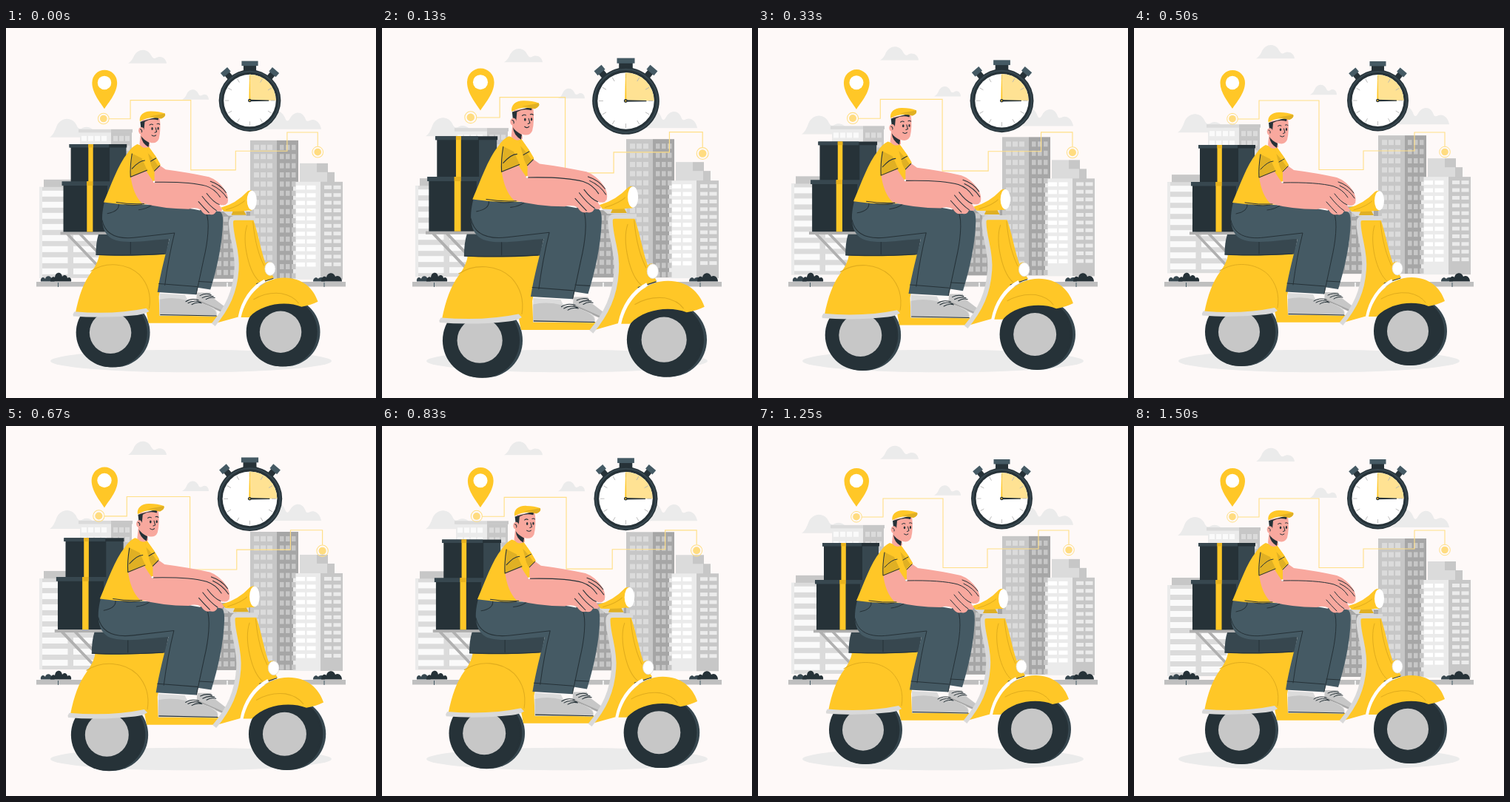
These frames come from a looping animation (500 by 500 pixels, 1540 ms). An HTML page:

```html
<!DOCTYPE html>
<html lang="en">
<head>
<meta charset="utf-8">
<title>Delivery scooter</title>
<style>
html, body { margin: 0; width: 100%; height: 100%; overflow: hidden; background: #fef9f8; }
svg { display: block; width: 100%; height: 100%; }
.y { fill: #ffc727; } .d { fill: #263238; } .s { fill: #37474f; } .b { fill: #455a64; }
.skin { fill: #f8a89e; } .shade { fill: #e0b024; }
.g1 { fill: #ebebeb; } .g2 { fill: #dbdbdb; } .g3 { fill: #c7c7c7; } .g4 { fill: #a6a6a6; }
.ln { fill: none; stroke: #263238; stroke-width: 1; stroke-linecap: round; stroke-linejoin: round; }
.gold { fill: none; stroke: #e0ac1d; stroke-width: 1; stroke-linecap: round; }
</style>
</head>
<body>
<svg viewBox="0 0 500 500" xmlns="http://www.w3.org/2000/svg">
  <g id="city">
    <g class="g1">
      <path d="M165 48C168 46 170 44 172 40C177 27 191 27 196 37C198 40 199 42 202 41C208 37 216 40 217 48Z"/>
      <path d="M238 97C241 95 243 93 244 90C248 81 257 82 260 89C261 92 263 92 265 91C269 88 274 91 274 97Z"/>
      <path d="M59 148C64 145 66 139 68 134C74 119 91 120 96 133C98 137 101 137 104 135C112 131 121 138 124 148Z"/>
      <path d="M345 137C352 135 356 129 359 121C364 108 374 112 378 124C380 127 382 126 384 122C390 112 401 112 405 124C406 127 409 126 411 125C418 122 425 129 426 137Z"/>
    </g>
    <rect class="g3" x="51" y="205" width="40" height="11"/>
    <rect class="g2" x="45" y="215" width="80" height="123"/>
    <rect class="g1" x="45" y="215" width="4" height="123"/>
    <g id="bands"></g>
    <rect class="g1" x="100" y="141" width="42" height="120"/>
    <rect class="g3" x="142" y="141" width="28" height="120"/>
    <rect class="g2" x="98" y="137" width="44" height="4.5"/>
    <rect class="g3" x="142" y="137" width="29" height="4.5"/>
    <rect class="g4" x="275" y="248" width="56" height="91"/>
    <rect class="g3" x="330" y="152" width="36" height="187"/>
    <rect class="g4" x="366" y="152" width="29" height="187"/>
    <rect class="g2" x="397" y="183" width="23" height="30"/>
    <rect class="g3" x="420" y="183" width="15" height="30"/>
    <rect class="g2" x="420" y="195" width="14" height="16"/>
    <rect class="g3" x="434" y="195" width="10" height="16"/>
    <rect class="g1" x="388" y="208" width="37" height="132"/>
    <rect class="g3" x="425" y="208" width="30" height="132"/>
    <g id="panes"></g>
  </g>

  <ellipse class="g1" cx="250" cy="450" rx="190" ry="15.3"/>
  <rect x="41" y="343" width="418" height="6.5" fill="#bfbfbf"/>
  <path d="M70.500 344v6M113 344v6M430 344v6" stroke="#455a64" stroke-width="1"/>
  <path d="M299 344v6" stroke="#fff" stroke-width="1.500"/>
  <path class="s" d="M47 342.500C46 337 51 335 53 339C54 334 61 334 62 340L66 342.500Z"/>
  <path class="d" d="M60 342.500C60 337 64 335 66 337C67 329 75 329 76 336C79 332 83 335 83 338C86 335 89 339 88 342.500Z"/>
  <path class="s" d="M415 342.500C415 338 419 335 422 339C424 336 430 336 431 342.500Z"/>
  <path class="d" d="M426 342.500C426 337 430 334 433 337C434 330 443 329 445 336C449 333 454 337 454 342.500Z"/>

  <g id="route">
    <path d="M140 123H169V98H250V191.500H310V166H379V141H420V160" fill="none" stroke="#ffdf87" stroke-width="1.100"/>
    <g fill="none" stroke="#ffdf87" stroke-width="1"><circle cx="133" cy="122.700" r="7.300"/><circle cx="420" cy="167.500" r="7.300"/></g>
    <g fill="#ffdc80"><circle cx="133" cy="122.700" r="4.800"/><circle cx="420" cy="167.500" r="4.800"/></g>
  </g>

  <g id="pin">
    <path class="y" d="M133 109C128 101 116.500 88 116.500 74A16.700 17 0 0 1 150 74C150 88 138 101 133 109Z"/>
    <circle cx="133" cy="74" r="9.200" fill="#fff"/>
  </g>

  <g id="watch">
    <rect class="d" x="321" y="50" width="17" height="9"/>
    <rect class="b" x="318.500" y="45" width="22" height="6.500"/>
    <g id="sides"></g>
    <circle class="d" cx="329.500" cy="98" r="41.500"/>
    <circle cx="329.500" cy="98" r="39" fill="none" stroke="#37474f" stroke-width="2"/>
    <circle cx="329.500" cy="98" r="35" fill="#fff"/>
    <path d="M329.500 98V63A35 35 0 0 1 364.500 98Z" fill="#ffe293"/>
    <g id="ticks" stroke="#b5b5b5" stroke-width=".8"></g>
    <path class="y" d="M328.300 98L329 63.500H329.600L330.300 98Z"/>
    <path class="d" d="M328 96.800L355 97.500V98.700L328 99.200Z"/>
    <circle class="d" cx="329.300" cy="98" r="2.200"/><circle class="y" cx="329.300" cy="98" r=".9"/>
  </g>

  <g id="ride">
    <!-- rack and parcels -->
    <path d="M84 278L126 322M101 278L130 308" stroke="#b0b0b0" stroke-width="3.600"/>
    <rect x="75" y="275.500" width="62" height="3.800" fill="#b0b0b0"/>
    <path class="d" d="M89 161H163V209H89Z"/><path class="s" d="M141 162H163V209H141Z"/>
    <path class="d" d="M87 158H164V162.500H87Z"/><path class="s" d="M87 158H140V162.500H87Z"/>
    <path class="d" d="M79 212H150V275.500H79Z"/><path class="s" d="M138 213H150V275.500H138Z"/>
    <path class="s" d="M77 208H150V213.500H77Z"/>
    <path class="y" d="M112.500 158h6.300v50h-6.300zM110.500 208h8v67.500h-8z"/>
    <path d="M112.500 158h6.300v4.500h-6.300zM110.500 208h8v5.500h-8z" fill="#e9b31e"/>

    <!-- wheels -->
    <g id="wheel">
      <circle class="s" cx="149" cy="410.700" r="46"/><circle class="d" cx="145" cy="410.700" r="46.300"/>
      <circle class="d" cx="142" cy="410.700" r="46"/><circle class="g3" cx="142" cy="410.700" r="28"/>
    </g>
    <use href="#wheel" x="228" y="-1"/>

    <!-- chassis -->
    <path class="y" d="M127 306L217 304L207 362L208 388H284L302 388L281 397.700H193L190 382Q142 389 95 385C100 360 106 344 116 330C122 322 126 314 127 306Z"/>
    <path d="M91.800 386L93.800 382.500Q147 387 190 378L194 382Q188 386 178 387Q133 392 92.300 388.500Z" fill="#d9d9d9"/>
    <path class="gold" d="M116 328C136 315 164 317 181 333C192 345 197 360 194 378"/>
    <path class="s" d="M126 279H222L217 305.500Q160 309 122.500 306.500Q122.500 290 126 279Z"/>
    <path class="ln" d="M169 289V305M123 306Q165 308 214 305" stroke-width=".7"/>

    <!-- shoes -->
    <path class="g3" d="M258 357L276 357L277 362L298 378Q299 382 292 384L257 368Z"/>
    <path d="M258 367L294 383" stroke="#a6a6a6" stroke-width="2"/>
    <path class="g2" d="M208 358L242 360L245 366Q268 371 281 378Q287 384 283 389L208 387Z"/>
    <path class="g3" d="M208 366Q226 362 244 367L266 372Q286 379 284 388H208Z"/>
    <path class="ln" d="M209 386.500L284 388" stroke-width=".8"/>
    <path class="ln" d="M243 369Q250 364 260 367M246 371Q254 366 263 370M251 373Q257 369 264 371M262 361Q270 357 277 360M265 364Q272 360 280 362M270 366Q276 362 282 364" stroke-width="1.300"/>

    <!-- leg shield -->
    <path class="y" d="M304 259L333 258C341 280 344 305 352 323L361 337Q341 345 331 354Q320 367 315 389L281 398.500C302 375 309 350 311 323C312 300 300 282 304 259Z"/>
    <path d="M336 257H309Q303 257 303.500 264C304 284 313 302 311 326C309 356 299 377 280 400" fill="none" stroke="#d9d9d9" stroke-width="6"/>
    <path class="gold" d="M325 267C318 288 327 331 343 343M333 262C335 285 341 309 350 325"/>
    <path class="g2" d="M292 247L324 246L324 254H300Z"/>
    <path class="shade" d="M307 246L319 244L324 253H304Z"/>
    <path class="y" d="M290 243Q310 238 326 221L331 220L331 246.500Q313 249 294 248Z"/>
    <path class="gold" d="M297 246Q315 241 324 232"/>
    <ellipse class="y" cx="329.500" cy="233.500" rx="7.500" ry="13.500"/>
    <ellipse cx="331.500" cy="233.300" rx="6.500" ry="13" fill="#fff"/>

    <!-- front fender -->
    <path class="ln" d="M338 345L360 338" stroke-width="3"/>
    <path d="M315 390C319 369 331 350 349 341" fill="none" stroke="#fff" stroke-width="4"/>
    <path class="y" d="M317 390C324 359 347 337 375 337C399 337 414 351 420 369Q410 374 398 376C378 368 346 371 328 390Z"/>
    <path class="gold" d="M334 366Q351 356 371 358Q387 361 394 371"/>
    <ellipse class="y" cx="354.500" cy="325.500" rx="7.500" ry="10"/>
    <ellipse cx="356" cy="325" rx="7" ry="9" fill="#fff" stroke="#dbdbdb" stroke-width=".7"/>

    <!-- trousers -->
    <path class="b" d="M262 246L288 248Q293 249 292.800 262C292 293 284.500 325 276 353L257 350Z"/>
    <path class="b" d="M134 236C162 239 220 238 263 247Q274 252 273 272C272 302 264 330 257 359.500L205 356.500C209 331 216 306 221 285C198 286 170 292 150 287C130 282 128 259 134 236Z"/>
    <path class="ln" d="M270 249C276 262 272 291 267 312L257 359M131 260C135 279 151 286 176 283L228 277Q220 309 215 347M207 345L258 349M260 342L278 343M153 237Q155 248 138 251M158 237Q166 242 184 239M180 246Q190 245 197 240" stroke-width=".9"/>

    <!-- rider -->
    <path class="skin" d="M200 181L209 187L216 192Q247 196 274 202Q286 206 296 220Q301 229 299 237L290 240L272 220L200 210Z"/>
    <path class="y" d="M178 158Q183 160 193 161L203 175L209 186L201 194L201 209L198 238Q166 241 133 236C143 213 152 186 165 170Q171 161 178 158Z"/>
    <path class="shade" d="M192 165L209 186L200 194Q195 183 189 177Z"/>
    <path class="y" d="M193 161L203 175L209 185L206 187Q198 175 191 169Z"/>
    <path class="skin" d="M169 200L190 194Q195 202 200 209Q238 208 265 212Q288 217 298 238Q294 242 287 238L292 246Q290 250 284 247Q282 254 274 252Q268 254 263 246Q256 242 247 245Q213 245 184 237Q172 225 169 200Z"/>
    <path class="shade" d="M170 170L168 203L192 193L184 177Z"/>
    <path class="y" d="M172 166L190 161L197 188L201 209L190 190L184 176Z"/>
    <path class="ln" d="M171 171Q168 188 169 202L191 193M171 191Q181 180 188 180M196 181Q201 178 203 177M201 194L208 187" stroke-width=".8"/>
    <path class="ln" d="M200 209Q248 208 270 214Q282 218 289 229M276 208Q289 212 297 223M278 213Q291 219 298 230M271 224Q280 236 288 239M265 228Q275 241 284 247M260 235Q267 243 274 250M150 236Q168 239 187 238" stroke-width="1"/>
    <circle cx="200.500" cy="208.500" r="1.300" fill="#fff"/>

    <!-- head -->
    <path class="skin" d="M183 139L181 158Q186 166 195 161L194 153Z"/>
    <path class="skin" d="M184 126L208 122Q210 139 207 151Q204 158 196 156Q188 153 186 145Z"/>
    <path class="d" d="M183 147Q186 152 194 156L193 162Q184 157 183 147Z"/>
    <path class="d" d="M182 128L207 121L206 126Q196 123 188 128L187 139L183 137Z"/>
    <ellipse class="skin" cx="183.500" cy="140" rx="3.800" ry="4.800"/>
    <path class="ln" d="M182 138Q185 139 184 142" stroke-width=".7"/>
    <path class="y" d="M181.500 127.500C180 119 187 113.500 197 114Q207 114 215 117Q217 121 210 124Q194 120 181.500 127.500Z"/>
    <path class="shade" d="M194 121Q205 119 215 117Q217 121 210 124Q202 121 194 121Z"/>
    <ellipse class="d" cx="198" cy="137.300" rx="1.200" ry="1.900"/><ellipse class="d" cx="206" cy="137" rx="1.100" ry="1.900"/>
    <path class="ln" d="M194.500 132.500Q197 130.500 199 132M204.500 131Q206.500 130 208 131.500M202.500 136L204 141.500L201.500 142.500M197.500 146Q200.500 148.500 203 146" stroke-width=".9"/>
  </g>
</svg>
<script>
const $ = id => document.getElementById(id);
const rect = (x, y, w, h, fill) => `<rect x="${x}" y="${y}" width="${w}" height="${h}" fill="${fill}"/>`;

// rows of windows, one column per x
function panes(xs, y, w, h, rows, step, fill) {
  let out = '';
  for (const x of xs)
    for (let i = 0; i < rows; i++) out += rect(x, y + i * step, w, h, fill);
  return out;
}

$('bands').innerHTML = panes([49, 91], 220, 34.5, 8, 8, 15, '#fafafa');
$('panes').innerHTML =
  panes([102, 111, 120, 129], 146, 7, 7, 4, 13, '#fafafa') +
  panes([145, 153, 161], 146, 6, 7, 4, 13, '#dbdbdb') +
  panes([285, 294, 303, 312], 255, 6, 7, 7, 12, '#c7c7c7') +
  panes([335, 344, 353], 158, 7, 7, 15, 12.4, '#dbdbdb') +
  panes([370, 378, 386], 158, 5.5, 7, 15, 12.4, '#c7c7c7') +
  panes([392, 406.5], 213, 12, 5.6, 11, 10.4, '#fff') +
  panes([430, 442.5], 213, 10, 5, 11, 10.4, '#ebebeb');

$('sides').innerHTML = [-40.5, 40.5].map(a => `<g transform="rotate(${a} 329.500 98)">` +
  rect(325.5, 50, 8, 8, '#263238') + rect(323.5, 44.5, 12, 7, '#455a64') + '</g>').join('');
$('ticks').innerHTML = Array.from({ length: 12 }, (_, i) =>
  `<path d="M329.500 64.500v5.500" transform="rotate(${i * 30} 329.500 98)"/>`).join('');

const LOOP = 1540, STEP = 1000 / 24, LEAD = 13, BEAT = 1500;
const beats = [[0, 1], [.1, 1.1], [.3, 1], [.4, 1], [.5, 1.1], [.6, 1], [1, 1]];
const centres = { ride: [249, 285], route: [276.5, 145], pin: [133, 83], watch: [329.5, 92.3] };

function pulse(p) {
  const i = beats.findIndex(b => p <= b[0]);
  const [p0, s0] = beats[i - 1], [p1, s1] = beats[i];
  return s0 + (s1 - s0) * (p - p0) / (p1 - p0);
}

function draw(ms) {
  // the motion runs at 24 pictures a second
  const k = Math.floor((ms % LOOP + 5) / STEP);
  const p = Math.min(1, (k * STEP + LEAD) / BEAT);
  const s = pulse(p);
  const lift = -10 * (1 - Math.abs(2 * p - 1));
  $('city').setAttribute('transform', `translate(0 ${lift})`);
  for (const id in centres) {
    const [x, y] = centres[id];
    $(id).setAttribute('transform', `translate(${x} ${y}) scale(${s}) translate(${-x} ${-y})`);
  }
}

const start = performance.now();
function tick() {
  draw(performance.now() - start);
  requestAnimationFrame(tick);
}
tick();
</script>
</body>
</html>
```
